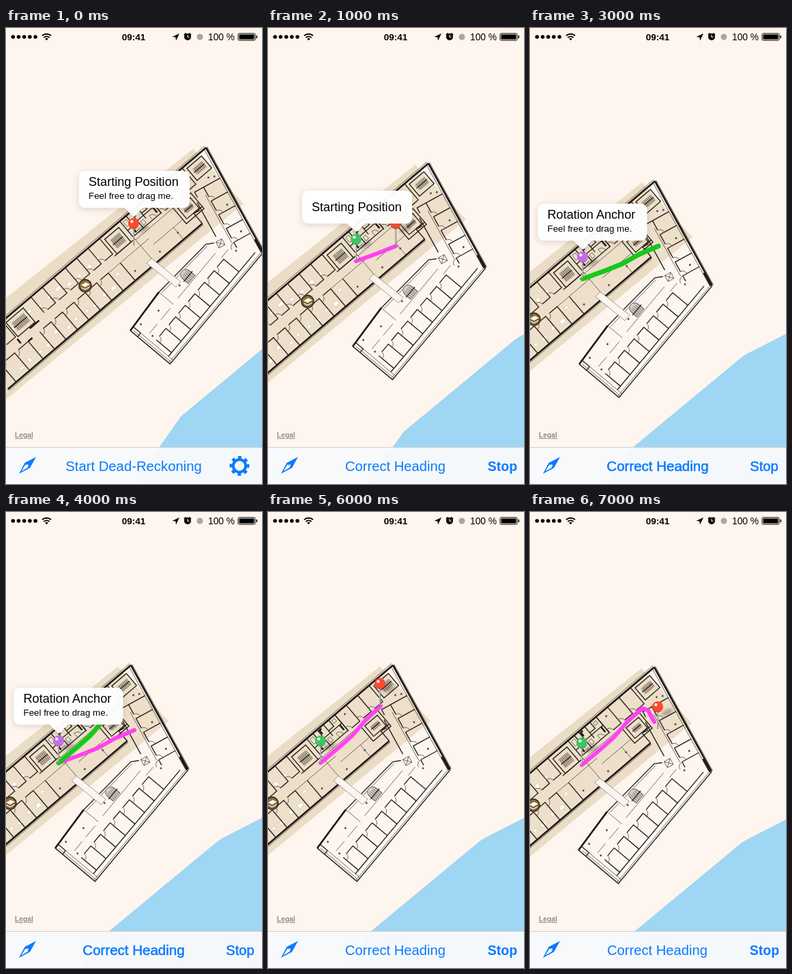
Recreate the animation shown at these times as an HTML page. Size 375 by 667 pixels, loop 8 s.

```html
<!DOCTYPE html>
<html lang="en">
<head>
<meta charset="utf-8">
<title>Indoor dead reckoning</title>
<style>
html,body{margin:0;width:100%;height:100%;overflow:hidden;background:#fdf5ee}
svg{display:block;font-family:"Liberation Sans",Arial,sans-serif}
.bar{fill:#0a7aff;font-size:20.2px}
.bold{font-weight:700}
.medium{stroke:#0a7aff;stroke-width:.55}
.mid{text-anchor:middle}
.route{fill:none;stroke:#ff41f1;stroke-width:6;stroke-linecap:round;stroke-linejoin:round}
.guide{stroke:#16c91b;stroke-width:7}
.wall{fill:none;stroke:#29231e;stroke-width:1.4}
.thick{fill:none;stroke:#1c1917;stroke-width:2.6}
.thin{fill:none;stroke:#4a433c;stroke-width:.7}

/* eight one-second scenes, all cuts */
.pan,#red,.guide,.s{animation:8s step-end infinite}
.pan{animation-name:pan}
#red{animation-name:red}
.guide{animation-name:turn}
.start{animation-name:start}
.first{animation-name:first}
.walk{animation-name:walk}
.green{animation-name:green}
.moving{animation-name:moving}
.track{animation-name:track}
.fix{animation-name:fix}
.sheet{animation-name:sheet}
.fixed{animation-name:fixed}
.last{animation-name:last}
@keyframes pan{
  0%{transform:translate(0,0)}
  12.5%{transform:translate(-58px,23px)}
  25%{transform:translate(-110px,49px)}
  87.5%,100%{transform:translate(-111px,52px)}
}
@keyframes red{
  0%{transform:translate(187px,318px);opacity:1}
  37.5%{transform:translate(187px,318px);opacity:0}
  75%{transform:translate(164px,283px);opacity:1}
  87.5%,100%{transform:translate(187px,317px);opacity:1}
}
@keyframes turn{0%{transform:rotate(0)}50%,100%{transform:rotate(-20deg)}}
@keyframes start{0%{opacity:1}12.5%,100%{opacity:0}}
@keyframes first{0%{opacity:0}12.5%{opacity:1}25%,100%{opacity:0}}
@keyframes walk{0%{opacity:0}12.5%{opacity:1}37.5%,100%{opacity:0}}
@keyframes green{0%{opacity:0}12.5%{opacity:1}37.5%{opacity:0}75%,100%{opacity:1}}
@keyframes track{0%{opacity:0}25%{opacity:1}75%,100%{opacity:0}}
@keyframes fix{0%{opacity:0}37.5%{opacity:1}75%,100%{opacity:0}}
@keyframes sheet{0%{opacity:0}62.5%{opacity:1}75%,100%{opacity:0}}
@keyframes fixed{0%{opacity:0}75%,100%{opacity:1}}
@keyframes last{0%{opacity:0}87.5%,100%{opacity:1}}
</style>
</head>
<body>
<svg width="375" height="667" viewBox="0 0 375 667">
<defs>
  <filter id="shade" x="-20%" y="-30%" width="140%" height="170%">
    <feDropShadow dx="0" dy="2" stdDeviation="5" flood-color="#6b5a48" flood-opacity=".22"/>
  </filter>
  <filter id="soft" x="-50%" y="-100%" width="200%" height="300%"><feGaussianBlur stdDeviation="2"/></filter>
  <g id="pin">
    <ellipse cx="14" cy="-24" rx="9" ry="4" transform="rotate(-25 14 -24)" fill="#000" opacity=".28" filter="url(#soft)"/>
    <path d="M0-25V0" stroke="#8d8a88" stroke-width="2.2"/>
    <path d="M-.5-25V-1" stroke="#d5d3d2" stroke-width=".8"/>
    <circle cy="-32" r="8"/>
    <path d="M-7-28a8 8 0 0 0 14 0a9 7 0 0 1-14 0" fill="#000" opacity=".13"/>
    <circle cx="-2.6" cy="-35" r="2.3" fill="#fff" opacity=".85"/>
  </g>
  <path id="leg" d="M0 0 33-12 58-22 83-36 111-48"/>
</defs>
<rect width="375" height="667" fill="#fdf5ee"/>

<g class="pan">
  <path d="M200 647 225 613 257 568 419 434Q423 431 430 427L485 399 620 329V760H200Z" fill="#9fd6f4" stroke="#95cbea" stroke-width=".8"/>
  <path d="M274 177 348 257-120 642V490Z" fill="#ebdcc5"/>
  <path d="M293 175 377 328 240 492 182 442 223 386 306 312 287 286-50 572V467Z" fill="#fff" opacity=".08"/>
  <g id="south" transform="translate(377 328) rotate(129.9)"></g>
  <g id="east" transform="translate(293 175) rotate(61.2)"></g>
  <g id="west" transform="translate(293 175) rotate(139.6) scale(1 -1)"></g>
  <path d="M206 344 213 337 256 371 249 379Z" fill="#fbf5ef" stroke="#8b8680" stroke-width=".8"/>
  <g transform="translate(116 377)">
    <circle r="9" fill="#8b6d43" stroke="#3d2f1d" stroke-width="1.8"/>
    <path d="M-6-1 1-5 7-2 0 2Z" fill="#fff6e2"/>
    <path d="M-6 1 0 4 7 0V3L0 7-6 4Z" fill="#f0dcb5" stroke="#3d2f1d" stroke-width=".7"/>
  </g>

  <g transform="translate(187 318)">
    <path class="route s first" d="M0 0 33-12 58-22"/>
    <use href="#leg" class="route s track"/>
    <g class="s fix"><use href="#leg" class="route guide"/></g>
    <g class="s fixed"><use href="#leg" class="route" transform="rotate(-20)"/></g>
    <path class="route s last" d="M82-77 88-82 92-82 97-80 101-72 106-63"/>
    <use href="#pin" fill="#3fc461" class="s green"/>
    <use href="#pin" fill="#c36fe2" class="s fix"/>
  </g>
</g>

<use href="#pin" id="red" fill="#fb4a2d"/>

<g class="pan"><g id="notes" transform="translate(187 318)"></g></g>

<text x="13" y="599" font-size="10.3" class="bold" fill="#8d8985" text-decoration="underline" stroke="#fff" stroke-width="1.5" stroke-opacity=".6" paint-order="stroke">Legal</text>

<g id="status">
  <g id="signal"></g>
  <g fill="none" stroke="#000" stroke-width="1.9">
    <path d="M53 11.2a10 10 0 0 1 13 0M55.4 14a6.3 6.3 0 0 1 8.2 0"/>
    <path d="M57.2 15.8a3.6 3.6 0 0 1 4.6 0L59.5 18.3Z" fill="#000" stroke="none"/>
  </g>
  <text x="187" y="17.6" class="bold mid" font-size="13.5">09:41</text>
  <path d="M254 8 249 18.5 248.4 13.6 243.5 13Z"/>
  <circle cx="266" cy="13" r="5"/>
  <path d="M266 10v3.2h2.6" fill="none" stroke="#fff" stroke-width="1.1"/>
  <path d="M261 10.3l2.6-2.8M271 10.3l-2.6-2.8" stroke="#000" stroke-width="1.8"/>
  <circle cx="284" cy="13" r="4.5" fill="#a9a5a1"/>
  <text x="296" y="17.6" font-size="13.8">100 %</text>
  <rect x="340" y="8" width="25" height="10" rx="1.5" fill="none" stroke="#000"/>
  <path d="M341.5 9.5h22v7h-22ZM366.5 11h1.5v4h-1.5Z"/>
</g>

<g id="toolbar">
  <rect y="613" width="375" height="54" fill="#f8f9fa" fill-opacity=".97"/>
  <path d="M0 613.5H375" stroke="#d3d0cd"/>
  <path d="M44 627.5 35 643.5 19 652 27.5 636Z" fill="#0a7aff"/>
  <path d="M28.6 638.2 32.6 642.4 22.5 648.4Z" fill="#f8f9fa"/>
  <circle cx="31.5" cy="639.7" r="1.5" fill="#f8f9fa"/>
  <g class="s start">
    <text x="187" y="648" class="bar mid" style="font-size:20.3px">Start Dead-Reckoning</text>
    <g fill="none" stroke="#0a7aff" transform="translate(342 640.5) rotate(-11)">
      <circle r="9.2" stroke-width="4"/>
      <circle r="12.4" stroke-width="4.2" stroke-dasharray="4.87"/>
    </g>
  </g>
  <g class="s green">
    <text x="186.5" y="648" class="bar mid">Correct Heading</text>
    <text x="343.5" y="648" class="bar bold mid" style="font-size:19.5px">Stop</text>
  </g>
  <g class="s fix">
    <text x="187" y="648" class="bar medium mid" style="font-size:20.5px">Correct Heading</text>
    <text x="343" y="648" class="bar medium mid">Stop</text>
  </g>
</g>

<g class="s sheet">
  <rect width="375" height="667" opacity=".4"/>
  <rect x="9" y="545" width="357" height="51" rx="4" fill="#fff" opacity=".85"/>
  <rect x="9" y="605" width="357" height="52" rx="4" fill="#fff"/>
  <text x="187" y="579" class="mid" font-size="24.4" fill="#fc4a33">Correct Heading</text>
  <text x="187.5" y="640" class="bold mid" font-size="24" fill="#0a7aff">Cancel</text>
</g>
</svg>
<script>
const put = (id, html) => { document.getElementById(id).innerHTML = html; };
const path = (kind, d) => `<path class="${kind}" d="${d}"/>`;
const span = (n, f) => Array.from({length: n}, (_, i) => f(i)).join('');

// A row of rooms from facade a to corridor b, each with a door leaf and its swing.
function rooms(u, w, n, a, b) {
  const s = Math.sign(b - a), sweep = s > 0 ? 0 : 1;
  return path('wall', span(n, i => `M${u + i * w} ${a}V${b}H${u + i * w + w - 7}`) + `M${u + n * w} ${a}V${b}`) +
    path('thin', span(n, i => `M${u + i * w + w} ${b}v${-7 * s}a7 7 0 0 ${sweep}-7 ${7 * s}`));
}
function stairs(u, v, w, h) {
  return `<rect class="wall" x="${u}" y="${v}" width="${w}" height="${h}"/>` +
    `<rect x="${u + 5}" y="${v + 6}" width="${w - 10}" height="${h - 12}" fill="#c4b7a2"/>` +
    path('thin', span(Math.floor((w - 9) / 2.5), i => `M${u + 5 + i * 2.5} ${v + 6}v${h - 12}`)) +
    path('wall', `M${u + 4} ${v + h / 2}h${w - 8}`);
}
const dot = (x, y) => `<circle cx="${x}" cy="${y}" r="1.5" fill="#5b534b"/>`;

let seed = 7;
const rnd = () => (seed = seed * 16807 % 2147483647) / 2147483647;
const desks = span(24, i => {
  const v = i % 2 ? 9 + rnd() * 12 : 55 + rnd() * 14;
  return `<rect x="${212 + i * 9 + rnd() * 4}" y="${v}" width="${4 + rnd() * 5}" height="${3 + rnd() * 4}" fill="#fff" stroke="#b9aa93" stroke-width=".4"/>`;
});

put('west',
  path('thick', 'M0 0H450M76 81H450') + path('thin', 'M0-3H450M76 83.5H450') +
  desks +
  rooms(46, 22, 3, 0, 31) + rooms(205, 22, 6, 0, 30) + rooms(228, 22, 6, 81, 47) + rooms(392, 24, 2, 0, 30) + rooms(382, 26, 2, 81, 47) +
  stairs(13, 5, 28, 23) + stairs(173, 6, 27, 28) + stairs(356, 5, 33, 27) + stairs(65, 41, 24, 20) +
  path('wall', 'M112 0V30H166V0M124 0V12H134V0M146 0V30M112 16H146M154 0V18H166M134 12V22M166 34H205M60 36H94V66H60ZM60 62H76V81M205 47V81') +
  path('thin', 'M128 30v-8a8 8 0 0 0-8 8M116 4h5v5h-5zM138 20h5v7h-5zM157 4h6v9h-6zM150 22h8v5h-8M94 36H166M94 58H150M166 34V81M150 47H228M112 58V81') +
  path('thick', 'M116 16v10M140 3h4v7M158 22v6M350 34h18M392 34v8M374 47h8') +
  dot(18, 40) + dot(112, 68) + dot(150, 72) + dot(100, 9) + dot(196, 70));

put('east',
  path('thick', 'M0 0H174M152 2H174') + path('thin', 'M0 3.5H172M0-2H174') +
  rooms(49, 23, 4, 3, 31) +
  path('wall', 'M64 50H121M49 31V46H58M141 31H150M76 52V60') +
  path('thin', 'M60 34H140M128 44h10v10h-10zM128 44l10 10M138 44l-10 10M141 31a8 8 0 0 0 8 8') +
  dot(40, 18) + dot(88, 13) + dot(132, 14));

put('south',
  '<path d="M0 0H213V9H0Z" fill="#fff" opacity=".4"/>' +
  path('thick', 'M213 76 143 80') +
  path('wall', 'M0 0H213V76M8 9H206M143 80 45 72 36 64M213 62H206V76') +
  path('thin', 'M0 2.5H213M206 0V76M141 76 46 69M210 0V72M143 52V80M46 53H132M30 42H46M150 52H172M180 52H198') +
  rooms(45, 22, 7, 9, 38) +
  '<path d="M90 55h16v10a8 9 0 0 1-16 0Z" class="thin" style="fill:#d6cfc6"/>' +
  path('thin', span(6, i => `M${91 + i * 2.8} 55v14`)) +
  path('wall', 'M88 62h20') +
  dot(164, 63) + dot(196, 70) + dot(116, 63) + dot(198, 46) + dot(24, 32));

function note(kind, x, y, w, h, tip, title, sub) {
  return `<g class="s ${kind}"><g filter="url(#shade)" opacity=".96">
    <path fill="#fff" d="M${x + 10} ${y}h${w - 20}q10 0 10 10v${h - 20}q0 10-10 10H13L2 ${tip - 1}Q0 ${tip + 1}-2 ${tip - 1}L-13 ${y + h}H${x + 10}q-10 0-10-10v${20 - h}q0-10 10-10Z"/></g>
    <text x="${x + 14}" y="${sub ? y + 22 : y + 30}" font-size="18.1">${title}</text>
    <text x="${x + 14}" y="${y + 40.5}" font-size="13.35">${sub}</text></g>`;
}
const hint = 'Feel free to drag me.';
put('notes',
  note('start', -80, -109, 162, 54, -42, 'Starting Position', hint) +
  note('walk', -79, -103, 161, 48, -43, 'Starting Position', '') +
  note('fix', -65.5, -110, 160, 54, -43, 'Rotation Anchor', hint));

put('signal', span(5, i => `<circle cx="${10.3 + i * 8.2}" cy="13" r="2.8"/>`));
</script>
</body>
</html>
```
